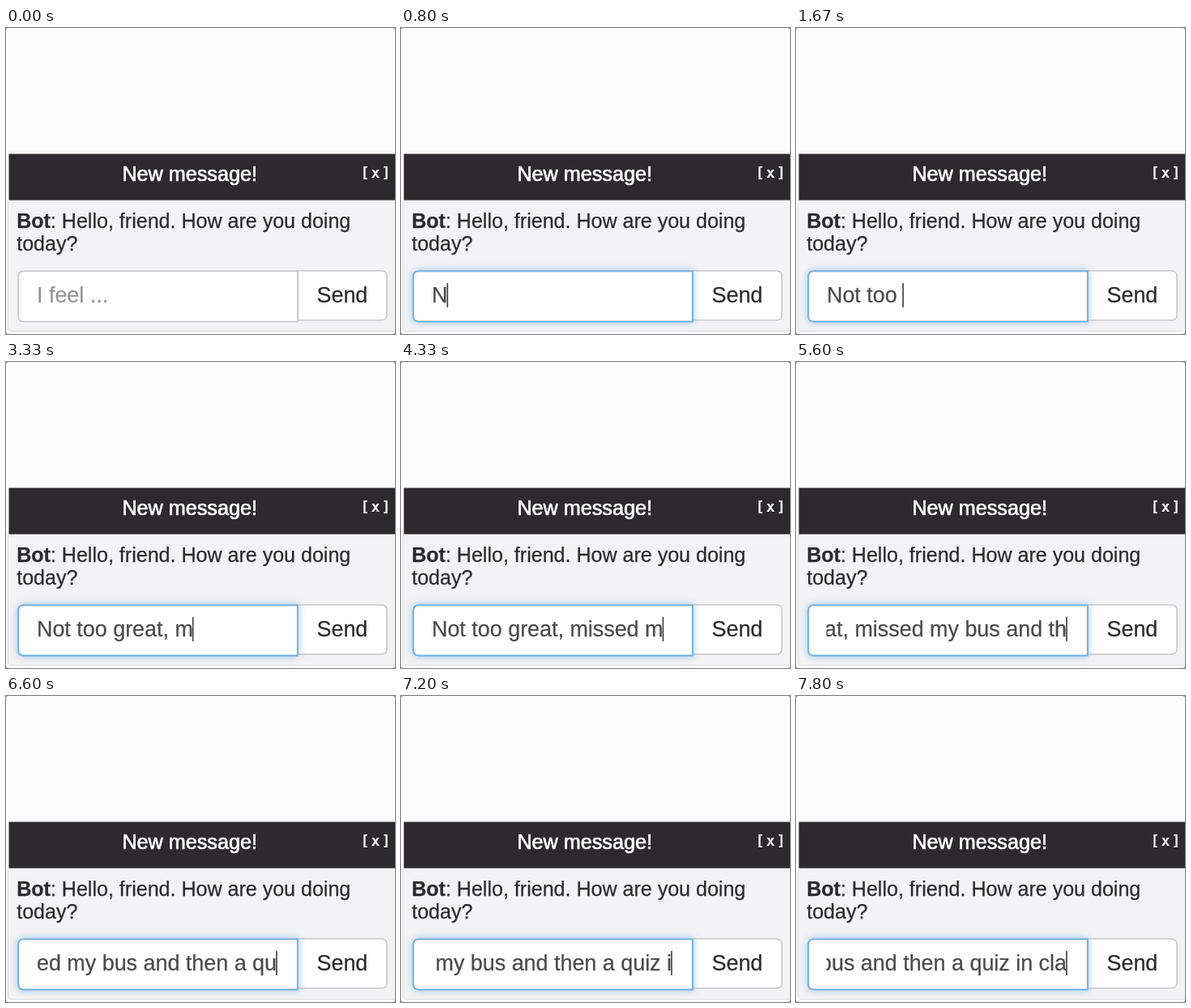
Write an HTML page that moves like this. It is 480 px wide and 378 px high and loops after 8000 ms.

```html
<!DOCTYPE html>
<html lang="en">
<head>
<meta charset="utf-8">
<title>Chat box</title>
<style>
  html, body { margin: 0; width: 100%; height: 100%; overflow: hidden; background: #fefdfe; }
  svg { display: block; width: 480px; height: 378px; }
  text {
    font: 25.05px "Liberation Sans", Arial, sans-serif; font-kerning: none; white-space: pre;
    fill: #2b2a2d; stroke: #2b2a2d; stroke-width: .25;
  }
  .title { font-size: 25.2px; fill: #fff; stroke: #fff; stroke-width: .7; }
  .close { font: bold 18.2px "DejaVu Sans Mono", monospace; letter-spacing: 2px; fill: #f4f4f5; stroke: none; }
  .big { font-size: 26.9px; }
  #hint { fill: #959497; stroke: #959497; }
  #typed { fill: #4b4a4d; stroke: #4b4a4d; }
</style>
</head>
<body>
<svg viewBox="0 0 480 378">
  <defs>
    <clipPath id="field"><rect x="37.5" y="302" width="299" height="58"/></clipPath>
    <filter id="blur" x="-10%" y="-40%" width="120%" height="180%"><feGaussianBlur stdDeviation="4"/></filter>
    <path id="box" d="M359.8 300.4H22Q15.2 300.4 15.2 307V356Q15.2 362.7 22 362.7H359.8Z"/>
  </defs>
  <rect width="480" height="378" fill="#9a999b"/>
  <rect width="480" height="378" rx="3.5" fill="#fefdfe"/>

  <path d="M3 212H480V374H6Q3 374 3 371Z" fill="#f3f2f4"/>
  <path d="M2.5 213V371Q2.5 374.5 6 374.5H480" fill="none" stroke="#dddcde"/>
  <rect x="3.5" y="155.5" width="477" height="57.2" fill="#2c2a2e"/>
  <text class="title" x="143.4" y="189">New message!</text>
  <text class="close" x="437.6" y="184.5">[x]</text>

  <text x="13.2" y="247"><tspan font-weight="bold">Bot</tspan>: Hello, friend. How are you doing</text>
  <text x="13.2" y="275">today?</text>

  <path d="M360 300H463Q470 300 470 307V354Q470 361 463 361H360Z" fill="#fefefe" stroke="#c9c8cb" stroke-width="1.6"/>
  <text class="big" x="383.5" y="339">Send</text>

  <use id="glow" href="#box" fill="#66afe9" stroke="#66afe9" stroke-width="3" filter="url(#blur)"/>
  <use href="#box" fill="#fefefe" stroke="#c9c8cb" stroke-width="1.7"/>
  <use id="ring" href="#box" fill="none" stroke="#6db1e6" stroke-width="1.8"/>
  <g clip-path="url(#field)">
    <text class="big" id="hint" x="38" y="339">I feel ...</text>
    <text class="big" id="typed" y="339"></text>
  </g>
  <rect id="caret" y="315" width="1.6" height="30" fill="#3c3b3e"/>
</svg>
<script>
const LOOP = 8000, FOCUS = 270, FADE = 150;
const LEFT = 38, RIGHT = 334;

// Each burst is typed at an even pace: text, first key, last key
const bursts = [
  ["Not too ", 800, 1600],
  ["great, m", 1930, 3200],
  ["is", 3470, 3530],
  ["sed my ", 3670, 4470],
  ["bus", 4670, 4930],
  [" and", 5070, 5330],
  [" th", 5470, 5600],
  ["en", 5730, 5800],
  [" a ", 6070, 6330],
  ["qu", 6530, 6600],
  ["iz in cla", 6800, 7800]
];

const $ = id => document.getElementById(id);
const [glow, ring, hint, typed, caret] = ["glow", "ring", "hint", "typed", "caret"].map($);
let shown = null;

function typedPart([text, first, last], t) {
  if (t < first) return "";
  const gap = (last - first) / (text.length - 1);
  return text.slice(0, 1 + Math.floor((t - first) / gap));
}

function showText(text) {
  if (text === shown) return;
  shown = text;
  typed.textContent = text;
  const width = text ? typed.getComputedTextLength() : 0;
  const x = Math.min(LEFT, RIGHT - width);
  typed.setAttribute("x", x);
  caret.setAttribute("x", x + width - 0.9);
  hint.style.visibility = text ? "hidden" : "visible";
}

function draw(t) {
  const p = Math.max(0, Math.min(1, (t - FOCUS) / FADE));
  const focus = p * p * (3 - 2 * p);
  glow.style.opacity = focus * 0.6;
  ring.style.opacity = focus;
  caret.style.opacity = t >= FOCUS ? 1 : 0;
  showText(bursts.map(b => typedPart(b, t)).join(""));
}

const start = performance.now();
function tick() {
  draw((performance.now() - start) % LOOP);
  requestAnimationFrame(tick);
}
tick();
</script>
</body>
</html>
```
